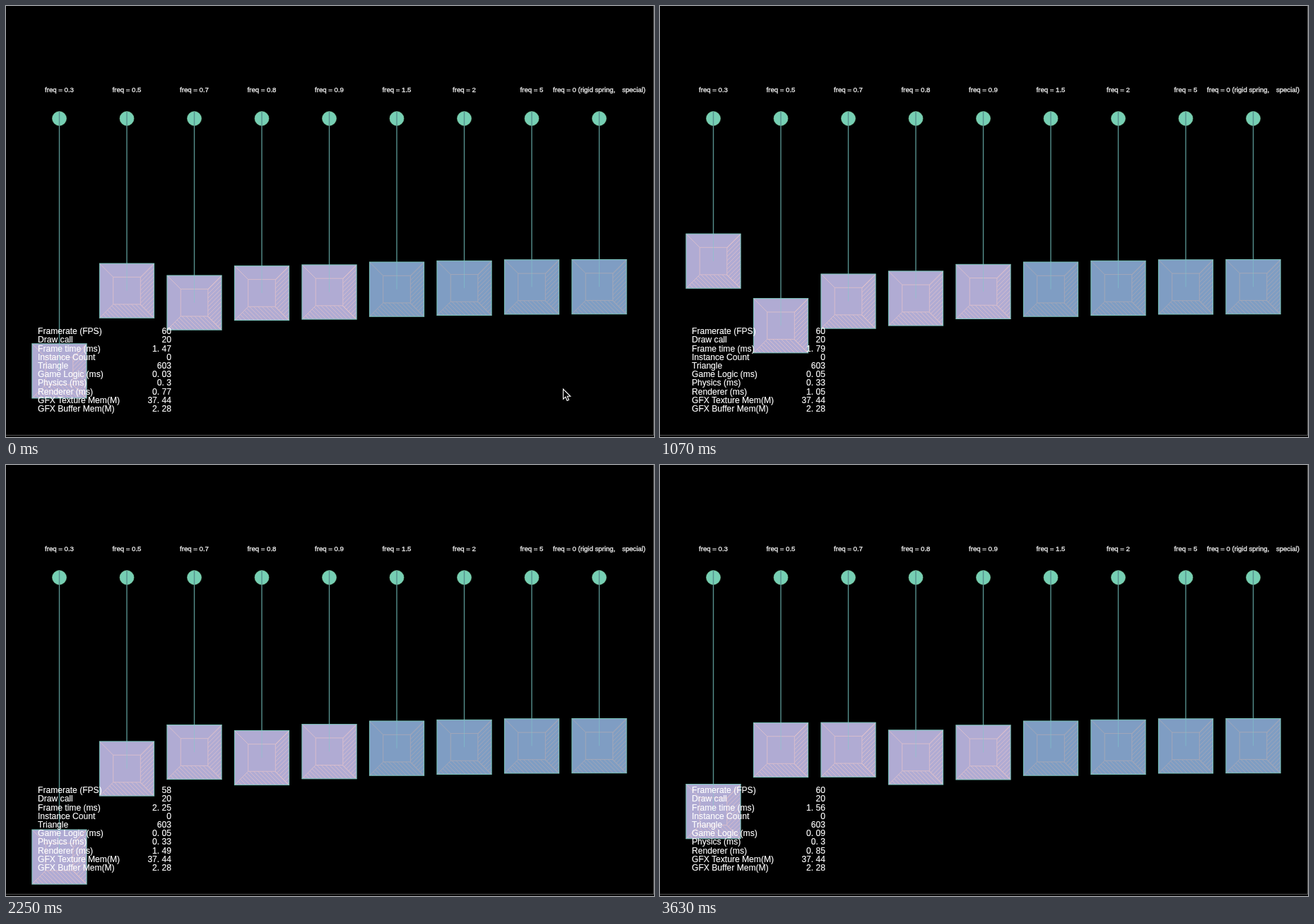
Animation of 917x611 px, one loop 3730 ms. Source, as an HTML page:

```html
<!DOCTYPE html>
<html lang="en">
<head>
<meta charset="utf-8">
<title>Spring frequencies</title>
<style>
  html, body { margin: 0; width: 100%; height: 100%; overflow: hidden; background: #000; }
  svg { display: block; width: 100%; height: 100%; }
  text { font-family: "Liberation Sans", Arial, sans-serif; white-space: pre; }
  .label { font-size: 9.6px; fill: #e4e4e4; stroke: #e4e4e4; stroke-width: .4; text-anchor: middle; }
  .stat { font-size: 12.1px; fill: #fff; stroke: #fff; stroke-width: .15; }
  .value { text-anchor: end; }
  .anchor { fill: #76cfb4; stroke: #86d8a8; stroke-width: .6; }
  .rod { stroke: #56908d; stroke-width: 1.4; }
  .core { stroke: #80cccc; opacity: .5; }
  .awake { fill: #b0abd3; color: #dcc0cc; }
  .asleep { fill: #7f9dc3; color: #a7a9b7; }
  .edge { fill: none; stroke: #7cc8bf; }
  .lines { fill: none; stroke: currentColor; stroke-width: .9; }
</style>
</head>
<body>
<svg id="stage" viewBox="0 0 917 611" preserveAspectRatio="none"></svg>
<script>
const LOOP = 3730, FIRST = 180, STEP = 147.5, LAST = 3630, STEPS = 24;
const HALF = 38.6, INNER = 19.3, ANCHOR_Y = 159.5;

// Top of each box: mid + swing * e^(-decay * n) * cos(2π (n - low) / period), n counted in steps.
const SPRINGS = [
  { label: "0.3", mid: 442.5, swing: 119.5, decay: 0, low: 18.2, period: 22.4 },
  { label: "0.5", mid: 391, swing: 47.2, decay: .0145, low: 4.9, period: 13.4 },
  { label: "0.7", mid: 374, swing: 13, decay: .015, low: 8.6, period: 9.7 },
  { label: "0.8", mid: 371.5, swing: 6.6, decay: .015, low: 6, period: 8.5 },
  { label: "0.9", mid: 368.9, swing: 4.2, decay: .06, low: 2.8, period: 7.56 },
  { label: "1.5", mid: 363 },
  { label: "2", mid: 361.3 },
  { label: "5", mid: 359.8 },
  { label: "0 (rigid spring,", tail: "special)", mid: 359.5 }
];

const STAT_NAMES = ["Framerate (FPS)", "Draw call", "Frame time (ms)", "Instance Count", "Triangle",
  "Game Logic (ms)", "Physics (ms)", "Renderer (ms)", "GFX Texture Mem(M)", "GFX Buffer Mem(M)"];
const READINGS = {
  frame: [1.47, 1.49, 1.79, 1.92, 2.25, 1.86, 1.43, 1.56],
  logic: [.03, .03, .05, .05, .05, .06, .04, .09],
  physics: [.3, .28, .33, .32, .33, .3, .31, .3],
  renderer: [.77, .87, 1.05, 1.21, 1.49, 1.18, .73, .85]
};
const STEPS_PER_READING = 3.35;

const springX = i => 75.5 + 95.5 * i;
const line = (cls, x, y1, y2) => `<line class="${cls}" x1="${x}" x2="${x}" y1="${y1}" y2="${y2}"/>`;
const square = cls => `<rect class="${cls}" x="${-HALF}" y="${-HALF}" width="${2 * HALF}" height="${2 * HALF}"/>`;

function hatch(slope) {
  let d = "";
  for (let c = -2 * HALF; c <= 2 * HALF; c += 6) {
    d += `M${-HALF} ${c - slope * HALF}L${HALF} ${c + slope * HALF}`;
  }
  return d;
}

// Inner square joined to the corners, hatched on the right and lower sides.
function bevel() {
  const a = HALF, b = INNER;
  let frame = `M${-b} ${-b}H${b}V${b}H${-b}Z`;
  for (const x of [-1, 1]) for (const y of [-1, 1]) frame += `M${x * a} ${y * a}L${x * b} ${y * b}`;
  return `<path class="lines" d="${frame}"/>
    <path class="lines" clip-path="url(#right)" d="${hatch(-1)}"/>
    <path class="lines" clip-path="url(#lower)" d="${hatch(1)}"/>`;
}

function build() {
  const a = HALF, b = INNER;
  let rods = "", boxes = "", labels = "";
  SPRINGS.forEach((s, i) => {
    const x = springX(i);
    const tail = s.tail ? `<tspan dx="9.6">${s.tail}</tspan>` : "";
    labels += `<text class="label" x="${x}" y="122">freq = ${s.label}${tail}</text>`;
    rods += `<circle class="anchor" cx="${x}" cy="${ANCHOR_Y}" r="10"/>` + line("rod", x, ANCHOR_Y - 10, 400);
    boxes += `<g class="box ${s.swing ? "awake" : "asleep"}">
      ${square("face")}${bevel()}${line("core", 0, -a, 0)}${square("edge")}</g>`;
  });
  const stats = STAT_NAMES.map((name, i) => {
    const y = 465.2 + 12.2 * i;
    return `<text class="stat" x="45" y="${y}">${name}</text><text class="stat value" x="234" y="${y}"></text>`;
  }).join("");
  return `<defs>
      <clipPath id="view"><rect width="916" height="608"/></clipPath>
      <clipPath id="right"><path d="M${b} ${-b}L${a} ${-a}V${a}L${b} ${b}Z"/></clipPath>
      <clipPath id="lower"><path d="M${-b} ${b}L${-a} ${a}H${a}L${b} ${b}Z"/></clipPath>
    </defs>
    <rect width="917" height="611"/>
    <g clip-path="url(#view)">${rods}${boxes}${labels}${stats}</g>
    <path d="M0 608.5H917M916.5 0V608" stroke="#555" fill="none"/>
    <path id="cursor" d="M0 0V14.2L3.3 11.2L5.6 16.4L8 15.3L5.8 10.3H10.2Z" fill="#000" stroke="#fff" stroke-width="1.1"/>`;
}

const stage = document.getElementById("stage");
stage.innerHTML = build();
const rods = stage.querySelectorAll(".rod");
const boxes = stage.querySelectorAll(".box");
const values = stage.querySelectorAll(".value");
const cursor = document.getElementById("cursor");

const spaced = number => String(number).replace(".", ". ");

function stepAt(time) {
  if (time >= LAST) return STEPS;
  return time < FIRST ? 0 : Math.min(STEPS - 1, 1 + Math.floor((time - FIRST) / STEP));
}

function boxTop({ mid, swing, decay, low, period }, n) {
  return swing ? mid + swing * Math.exp(-decay * n) * Math.cos(2 * Math.PI * (n - low) / period) : mid;
}

function render(time) {
  const step = stepAt(time);
  // The first and last steps are shorter than the rest.
  const n = Math.min(Math.max(step, .3), STEPS - .5);
  SPRINGS.forEach((s, i) => {
    const top = boxTop(s, n);
    boxes[i].setAttribute("transform", `translate(${springX(i)} ${(top + HALF).toFixed(2)})`);
    rods[i].setAttribute("y2", top.toFixed(2));
  });

  const k = Math.min(7, Math.floor((step + .5) / STEPS_PER_READING));
  const [frame, logic, physics, renderer] = Object.values(READINGS).map(list => list[k]);
  [frame > 2 ? 58 : 60, 20, frame, 0, 603, logic, physics, renderer, 37.44, 2.28]
    .forEach((value, i) => { values[i].textContent = spaced(value); });

  const dash = (Math.min(step, 3) / 3) ** 5;
  const drift = step === 5 ? 3 : 0;
  cursor.setAttribute("transform", `translate(${788.5 + 74.5 * dash + drift} ${543 + 55 * dash + drift})`);
  cursor.setAttribute("visibility", step > 5 ? "hidden" : "visible");
}

const start = performance.now();
function tick() {
  render((performance.now() - start) % LOOP);
  requestAnimationFrame(tick);
}
tick();
</script>
</body>
</html>
```
